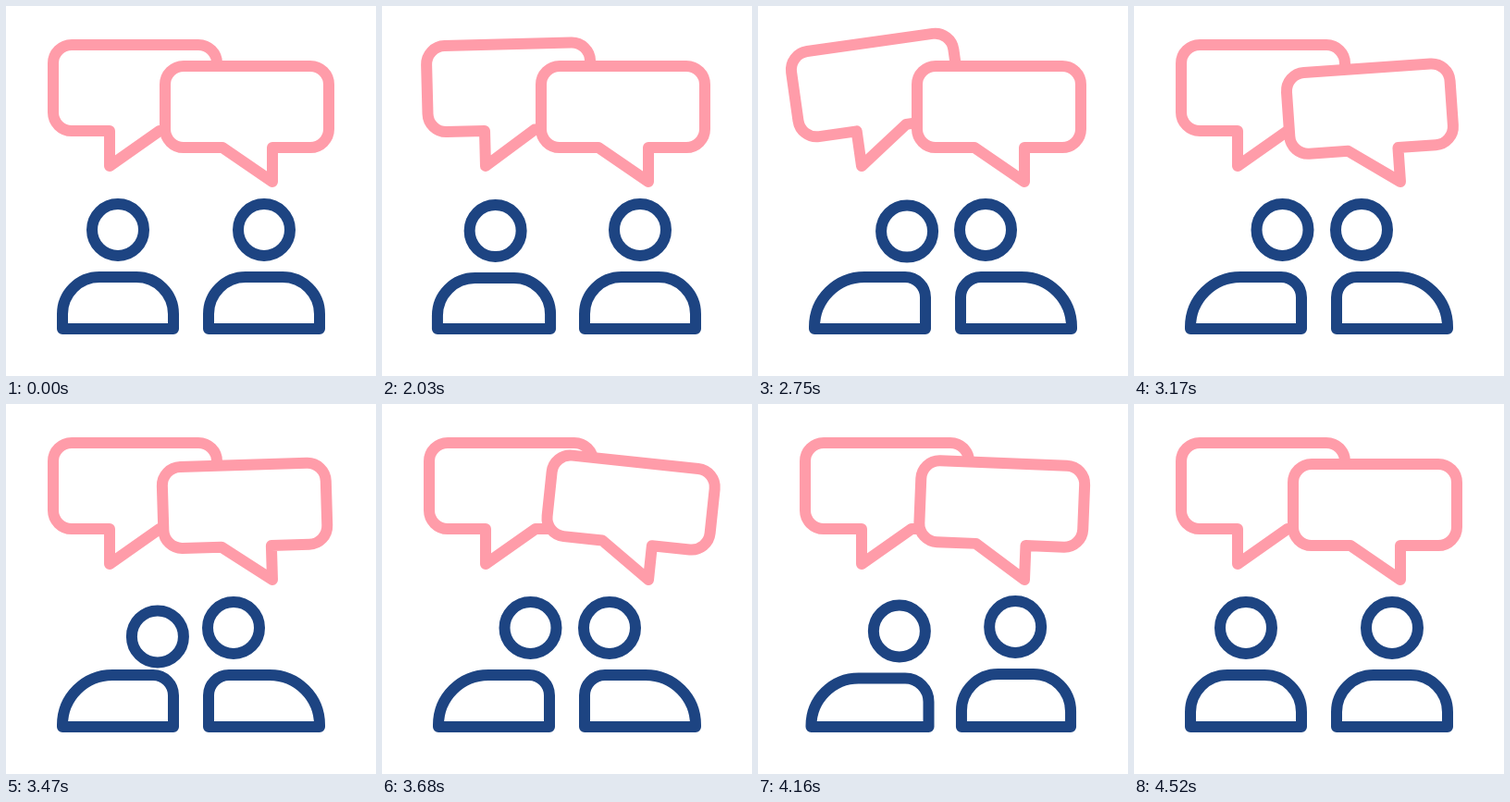
An HTML page for the animation above (4.55 s loop, 400 px wide and 400 px high).

```html
<!DOCTYPE html>
<html lang="en">
<head>
<meta charset="utf-8">
<title>Conversation</title>
<style>
  html, body { margin: 0; width: 100%; height: 100%; overflow: hidden; background: #fff; }
  svg { display: block; width: 100vw; height: 100vh; fill: none; stroke-width: 12; stroke-linecap: round; stroke-linejoin: round; }
  .bubble { stroke: #ff9ca9; fill: #fff; }
  .person { stroke: #1d4482; }
</style>
</head>
<body>
<svg viewBox="0 0 400 400">
  <path id="bubbleL" class="bubble" d="M112 135V173L166 135H208A20 20 0 0 0 228 115V62A20 20 0 0 0 208 42H71A20 20 0 0 0 51 62V115A20 20 0 0 0 71 135Z"/>
  <path id="bubbleR" class="bubble" d="M288 153V190L234 153H192A20 20 0 0 1 172 133V85A20 20 0 0 1 192 65H329A20 20 0 0 1 349 85V133A20 20 0 0 1 329 153Z"/>
  <g id="left" class="person"><circle r="28"/><path/></g>
  <g id="right" class="person" transform="matrix(-1 0 0 1 400 0)"><circle r="28"/><path/></g>
</svg>
<script>
const LOOP = 4550, START = 2030, STEP = 30;
const $ = id => document.getElementById(id);
const ease = u => (1 - Math.cos(Math.PI * Math.min(1, Math.max(0, u)))) / 2;
const mix = (a, b, u) => a + (b - a) * u;

// Eased interpolation through [time, value] pairs.
function track(keys, t) {
  if (t <= keys[0][0]) return keys[0][1];
  for (let i = 1; i < keys.length; i++) {
    const [t0, a] = keys[i - 1], [t1, b] = keys[i];
    if (t < t1) return mix(a, b, ease((t - t0) / (t1 - t0)));
  }
  return keys[keys.length - 1][1];
}

const SWING = [[-15, 0], [240, -20], [470, 14.2], [715, -8.7], [950, 3.8], [1180, 0]];
const SQUASH = [[0, 0], [130, 4], [290, -1], [440, 0]];
const NOD = [[0, 0], [240, 1], [480, 0]];
const TURN = 345;

const people = [
  { el: $('left'), turnIn: 1985, turnOut: 4060, reach: 39.5, nods: [2690, 3170], lean: 4 },
  { el: $('right'), turnIn: 2040, turnOut: 3850, reach: 33, nods: [3675], lean: 0 }
];

function drawPerson(p, t) {
  const turn = ease((t - p.turnIn) / TURN) - ease((t - p.turnOut) / TURN);
  const s = track(SQUASH, t - p.turnIn) + track(SQUASH, t - p.turnOut);
  const nod = p.nods.reduce((sum, n) => sum + track(NOD, t - n), 0);
  const [head, body] = p.el.children;
  head.setAttribute('cx', 121 + p.reach * turn + p.lean * nod);
  head.setAttribute('cy', 242 + s + 11 * nod);

  const l = 61 - s, r = 181 + s, top = 293 + s;
  const back = mix(40, 54, turn), front = mix(40, 22, turn);
  const backY = Math.min(back, 349 - top);
  body.setAttribute('d',
    `M${l} 349V${top + backY}A${back} ${backY} 0 0 1 ${l + back} ${top}` +
    `H${r - front}A${front} ${front} 0 0 1 ${r} ${top + front}V349Z`);
}

function draw(t) {
  t = t < START ? 0 : START + Math.floor((t - START) / STEP) * STEP;
  $('bubbleL').setAttribute('transform', `rotate(${track(SWING, t - 2000)} 112 173)`);
  $('bubbleR').setAttribute('transform', `rotate(${track(SWING, t - 3110)} 288 190)`);
  people.forEach(p => drawPerson(p, t));
}

const begin = performance.now();
function tick() {
  draw((performance.now() - begin) % LOOP);
  requestAnimationFrame(tick);
}
tick();
</script>
</body>
</html>
```
